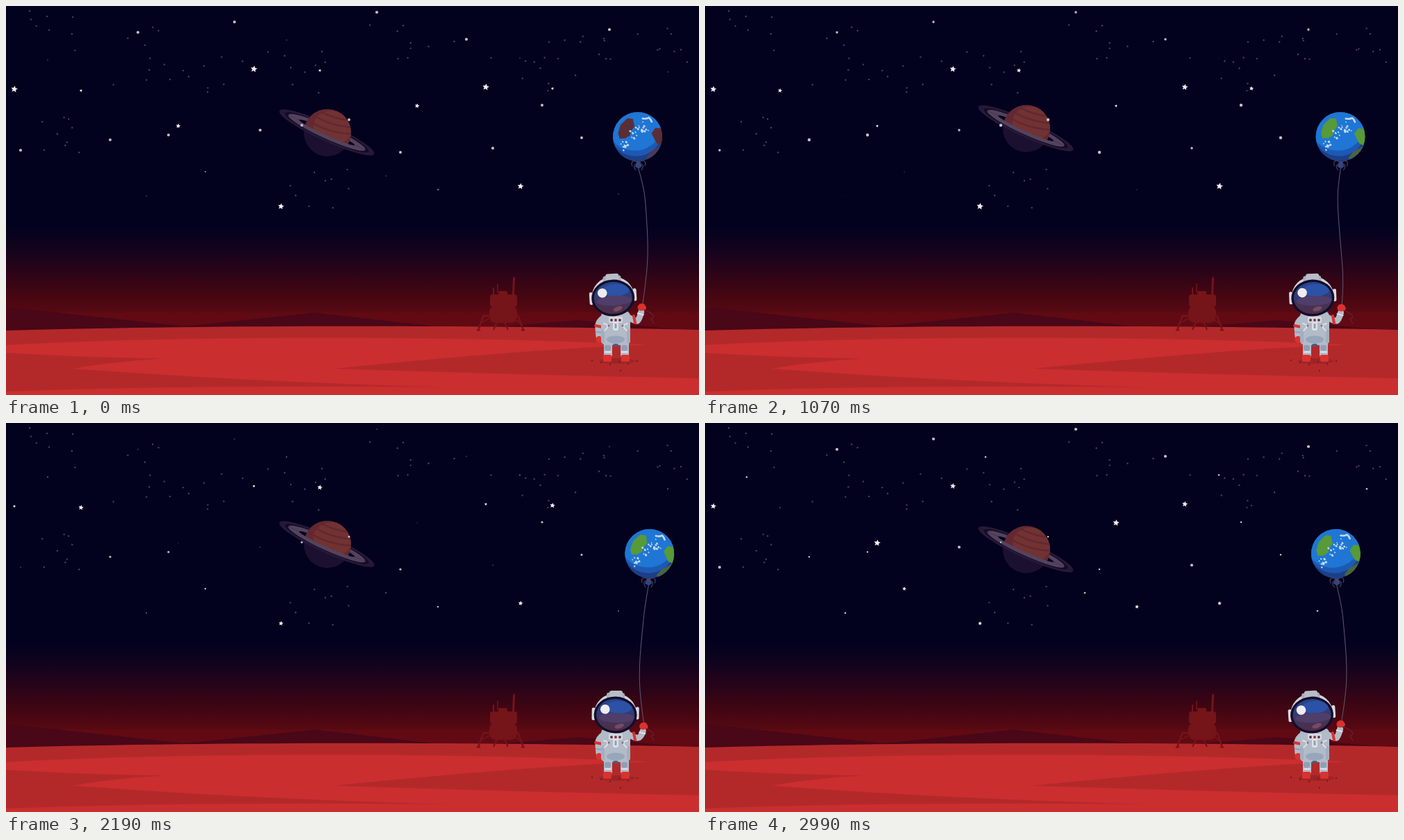
An HTML page with a canvas for the animation above (3060 ms loop, 998 by 561 pixels).

```html
<!DOCTYPE html>
<html lang="en">
<head>
<meta charset="utf-8">
<title>Astronaut with a balloon</title>
<style>
html, body { margin: 0; width: 100%; height: 100%; overflow: hidden; background: #03021e; }
canvas { display: block; width: 998px; height: 561px; }
</style>
</head>
<body>
<canvas id="stage" width="998" height="561"></canvas>
<script>
const c = document.getElementById('stage').getContext('2d');
const W = 998, H = 561, LOOP = 3060, SWAY = LOOP / 2, TWINKLE = LOOP / 6, TAU = Math.PI * 2;
const RAD = Math.PI / 180, HOLD = 130;

// The picture advances in even steps; each run is [start, steps]
const RUNS = [[0, 1], [150, 5], [810, 5], [1460, 3], [1860, 2], [2190, 2], [2470, 5]];

// Main twinkling stars: time of the peak, size, shape, places
const GROUPS = [
  [0, 5, star, [12,120, 357,91, 691,117]],
  [50, 5, star, [741,260, 396,289]],
  [320, 5, star, [287,239, 622,265]],
  [410, 5, star, [592,144, 248,173]],
  [125, 4, star, [108,122, 452,93, 787,119]],
  [475, 2.2, dot, [534,9, 329,23, 190,38, 663,48, 869,34, 366,179, 21,208, 701,205]],
  [55, 2.2, dot, [150,193, 772,143, 829,190, 494,164, 426,172, 234,186, 568,211]],
  [320, 2.3, dot, [60,78, 202,274, 882,271, 547,245, 404,49, 740,75, 953,95]]];

// Faint stars gather loosely around these places
const CLUSTERS = [60,35, 190,70, 300,100, 430,85, 590,50, 765,95, 810,55, 925,55, 90,180, 440,270];

const wave = (t, peak, period) => Math.cos(TAU * (t - peak) / period);
const clamp = v => Math.max(0, Math.min(1, v));

function seeded(seed) {
  return () => (seed = (seed * 16807) % 2147483647) / 2147483647;
}
function eachPoint(list, fn) {
  for (let i = 0; i < list.length; i += 2) fn(list[i], list[i + 1]);
}
function scatter(centres, count, rx, ry, seed, fn) {
  const rnd = seeded(seed), off = () => rnd() + rnd() - 1;
  eachPoint(centres, (x, y) => {
    for (let i = 0; i < count; i++) fn(x + rx * off(), y + ry * off(), rnd());
  });
}
function trace(pts, closed) {
  c.beginPath();
  eachPoint(pts, (x, y) => c.lineTo(x, y));
  if (closed) c.closePath();
}
function poly(color, ...pts) {
  c.fillStyle = color;
  trace(pts, true);
  c.fill();
}
function line(color, width, ...pts) {
  c.strokeStyle = color;
  c.lineWidth = width;
  trace(pts);
  c.stroke();
}
function oval(color, x, y, rx, ry = rx, turn = 0) {
  c.fillStyle = color;
  c.beginPath();
  c.ellipse(x, y, rx, ry, turn, 0, TAU);
  c.fill();
}
function box(color, x, y, w, h, r = 0) {
  c.fillStyle = color;
  c.beginPath();
  c.roundRect(x, y, w, h, r);
  c.fill();
}
// Smooth open curve guided by the given points
function curve(color, width, ...p) {
  const n = p.length;
  c.strokeStyle = color;
  c.lineWidth = width;
  c.beginPath();
  c.moveTo(p[0], p[1]);
  for (let i = 2; i < n - 4; i += 2)
    c.quadraticCurveTo(p[i], p[i + 1], (p[i] + p[i + 2]) / 2, (p[i + 1] + p[i + 3]) / 2);
  c.quadraticCurveTo(...p.slice(-4));
  c.stroke();
}
function turned(x, y, angle, draw) {
  c.save();
  c.translate(x, y);
  c.rotate(angle);
  draw();
  c.restore();
}
function inside(x, y, rx, ry, draw) {
  c.save();
  c.beginPath();
  c.ellipse(x, y, rx, ry, 0, 0, TAU);
  c.clip();
  draw();
  c.restore();
}
function gradient(top, bottom, ...colors) {
  const g = c.createLinearGradient(0, top, 0, bottom);
  colors.forEach((color, i) => g.addColorStop(i / (colors.length - 1), color));
  return g;
}
function dot(x, y, r) { oval('#c4bfcb', x, y, r); }
function star(x, y, r) {
  c.fillStyle = '#f1eef4';
  c.beginPath();
  for (let i = 0; i < 10; i++) {
    const a = i * TAU / 10 - Math.PI / 2 + 0.15, d = i % 2 ? r * 0.48 : r;
    c.lineTo(x + d * Math.cos(a), y + d * Math.sin(a));
  }
  c.fill();
}

function sky() {
  c.fillStyle = gradient(320, 448, '#03021e', '#14031d', '#2b0418', '#440612', '#5c0a13');
  c.fillRect(0, 0, W, H);
}

function hills() {
  const bump = (x, mid, height, reach) => height * Math.max(0, 1 - Math.abs(x - mid) / reach);
  box('#610a14', 0, 442, W, 40);
  const pts = [0, 480];
  for (let x = 0; x <= W; x += 6)
    pts.push(x, 461 + x / 200 - bump(x, 0, 27, 260) - bump(x, 445, 21, 190) - bump(x, 825, 12, 140));
  poly('#490717', ...pts, W, 480);
}

function ground() {
  c.fillStyle = '#b3292a';
  c.beginPath();
  c.moveTo(0, 468);
  c.bezierCurveTo(300, 460, 680, 460, W, 467);
  c.lineTo(W, H);
  c.lineTo(0, H);
  c.fill();
  c.fillStyle = '#cb2e2f';
  c.beginPath();
  c.moveTo(0, 489);
  c.bezierCurveTo(250, 475, 650, 475, 925, 488.5);
  c.quadraticCurveTo(760, 494, 472, 523);
  c.quadraticCurveTo(740, 532, W, 537);
  c.lineTo(W, H);
  c.lineTo(0, H);
  c.lineTo(0, 556);
  c.quadraticCurveTo(280, 546, 640, 550);
  c.quadraticCurveTo(350, 542, 97, 523);
  c.quadraticCurveTo(150, 513, 228, 508.5);
  c.quadraticCurveTo(90, 506, 0, 500);
  c.fill();
}

function lander() {
  const k = '#751419';
  line(k, 1.5, 732, 391, 730, 418);
  line(k, 3, 731.5, 393, 730.5, 417);
  line(k, 1.5, 708, 401, 708, 413);
  line(k, 2, 702, 407, 702, 418);
  box(k, 709, 411, 13, 8, 2);
  box(k, 697, 416, 39, 18, 4);
  box(k, 696, 432, 40, 25, 9);
  for (const s of [-1, 1]) {
    const x = d => 712.5 + s * d;
    line(k, 2.5, x(16), 447, x(25), 447, x(32), 466);
    line(k, 1.5, x(17), 451, x(28), 457);
    line(k, 2.2, x(5), 455, x(10), 466);
    line(k, 1.8, x(30), 467.5, x(34), 467.5);
  }
}

function ringPart(color, outer, inner, from) {
  c.fillStyle = color;
  c.beginPath();
  c.ellipse(0, 0, ...outer, 0, from, from + Math.PI);
  c.ellipse(0, 0, ...inner, 0, from + Math.PI, from, true);
  c.fill();
}
function rings(from) {
  ringPart('#281938', [75, 12.5], [66, 9.8], from);
  ringPart('#140c2a', [66, 9.8], [61, 8.5], from);
  ringPart('#54435d', [61, 9], [44, 4], from);
}

function planet(t) {
  const a = TAU * t / SWAY, lift = 4 * Math.cos(a) + 0.4 * Math.cos(2 * a), R = 34;
  turned(462, 177.9 + lift, 24.5 * RAD, () => {
    oval('#1c1030', 1, 0, R);
    rings(Math.PI);
    inside(1, 0, R, R, () => {
      c.beginPath();
      c.rect(-80, -80, 160, 85);
      c.clip();
      c.fillStyle = '#642831';
      c.fillRect(-40, -40, 80, 80);
      oval('#713232', 5, -10, 28, 24, -0.2);
      for (let y = -26; y < 0; y += 10) curve('#622831', 2.5, -36, y, 0, y + 8, 38, y - 9);
    });
    rings(0);
  });
}

function stars(t) {
  scatter(CLUSTERS, 9, 75, 45, 77, (x, y) => oval('#474154', x, y, 1.2));
  for (const [peak, size, shape, places] of GROUPS) {
    const s = 0.55 + 0.45 * wave(t, peak, TWINKLE);
    eachPoint(places, (x, y) => shape(x, y, size * s));
  }
}

function meteor(t) {
  const p = t % SWAY;
  const head = 1 - (1 - clamp(p / 330)) ** 1.6, tail = 1 - (1 - clamp((p - 60) / 480)) ** 2.1;
  if (head - tail < 0.01) return;
  const at = (u, a, b, d) => (1 - u) ** 2 * a + 2 * u * (1 - u) * b + u * u * d;
  const pts = [];
  for (let i = 0; i <= 12; i++) {
    const u = tail + (head - tail) * i / 12;
    pts.push(at(u, 231, 324, 369), at(u, 10, 17, 92));
  }
  line('#f6f3f8', 1.7, ...pts);
}

function earth(brown) {
  const R = 35.5, land = brown ? '#5b2d36' : '#579a37', shade = brown ? '#4c3a58' : '#4b6440';
  inside(0, 0, R, R, () => {
    c.fillStyle = '#1d3f86';
    c.fillRect(-R, -R, 2 * R, 2 * R);
    oval('#1d59b4', -2, -6, 37, 34);
    oval('#1f76d4', -4, -13, 38, 33);
    poly(land, -24, -18, -14, -27, -6, -26, -4, -15, -9, -9, -11, -2, -18, 2, -26, 2, -28, -6);
    poly(land, 20, -4, 26, -12, 34, -11, 37, 0, 34, 13, 27, 10);
    poly(shade, 11, 31, 18, 22, 29, 16, 36, 10, 28, 27, 16, 34);
    const cloud = '#c3d9ec';
    curve(cloud, 2.6, 8, -26, 14, -25, 18, -28, 21, -21);
    scatter([-3, -6, -19, 12, 10, -11], 9, 11, 11, 5, (x, y, v) =>
      oval(cloud, x, y, 0.8 + 1.4 * v, 0.7 + v, 0.8));
  });
}

function balloon(t, n, brown) {
  const x = 917.5 + 9.4 * n, lean = Math.atan(9.4 * n / 245);
  const hand = [917.5 + n, 432 + n];
  const at = (peak, amp) => 918 + amp * wave(t, peak, SWAY);
  curve('#625874', 1, 917.5 + 8 * n, 234, at(360, 7), 262, at(250, 7), 291,
    at(0, 7), 351, at(-170, 5), 396, ...hand);
  curve('#6a2a45', 1, hand[0], 438, 926, 441 + n, 934, 448 + n, 930, 452, 928, 450, 933, 458);
  turned(x, 188.5, lean, () => {
    poly('#2a4788', -2, 35, 2, 35, 5, 43, 0, 46, -5, 43);
    for (const s of [-1, 1]) {
      curve('#574253', 1.1, 0, 38, s * 6, 33, s * 11, 38, s * 9, 42);
      curve('#574253', 1.1, 0, 39, s * 5, 39, s * 7, 44, s * 4, 48);
    }
    earth(brown);
  });
}

function helmet(n) {
  turned(877, 467, (-1.5 + 2.3 * n) * RAD, () => {
    box('#d9dae0', -34, -56, 5, 18, 2);
    box('#d9dae0', 29, -58, 5, 18, 2);
    oval('#cfd1d9', 0, -48, 30.5, 29);
    box('#a9aebb', -13, -78, 26, 10, 3);
    box('#b9bdc8', -9, -81, 19, 12, 3);
    oval('#130d2b', 0, -46, 31, 26.5);
    inside(0, -46, 27.5, 23, () => {
      c.fillStyle = gradient(-69, -23, '#27458f', '#2b3f82', '#443459', '#4e2d45');
      c.fillRect(-32, -72, 64, 52);
      oval('#2b52a6', 5, -57, 19, 9);
      oval('#4f3e69', 2, -42, 26, 7);
      oval('#764a62', 6, -30, 7, 3.2, -0.3);
    });
    oval('#efebee', -15, -54, 6.8);
  });
}

function astronaut(n, hx, hy) {
  const red = '#d9322f', suit = '#b2bbc8', pale = '#dfe1e6', blue = '#8f9fb8';
  oval('#9d2426', 880, 512, 26, 4);
  for (let i = 0; i < 6; i++) oval('#7b1a1e', 844 + 13 * i, 511 + i * 3 % 7, 1.2);
  oval('#7b1a1e', 885, 526, 1.2);

  for (const s of [-1, 1]) {
    const x = 879 + s * 12;
    box(suit, x - 6, 482, 12, 24, 3);
    box(blue, x - 5, 489, 9, 8, 3);
    line(pale, 2, x - 4, 499, x + 4, 499);
    box(red, x - 6 + s, 503, 12, 10, 2);
  }
  // resting arm
  curve(suit, 9, 861, 449, 853, 455, 853, 466, 854, 476);
  line(red, 4, 849, 461, 859, 463);
  line(blue, 2, 850, 470, 858, 471);
  oval(red, 854, 481, 4.5, 5);
  // raised arm
  curve(suit, 9, 896, 449, 907, 455, hx - 4, 453, hx - 1, hy + 7);
  line(red, 4, 904, 447, 906, 457);
  line(pale, 2, hx - 6, hy + 9, hx + 2, hy + 11);
  // torso
  box(suit, 857, 440, 42, 49, 7);
  oval('#97a6bb', 878, 481, 13, 5.5);
  box('#d6d8df', 868, 448, 20, 9, 2);
  for (let i = -1; i < 2; i++) oval(i ? '#50384c' : '#982d36', 878 + 6 * i, 453, 1.9);
  box(pale, 874, 456, 8, 12, 3);
  box(blue, 876.5, 458, 3, 7, 1);
  for (const s of [-1, 1]) {
    const x = 878 + s * 12;
    box('#a3afc0', 878 + s * 18.5 - 2.5, 466, 5, 20, 2);
    curve(pale, 2, x + s * 5, 458, x, 459, x - s, 464, x + s * 4, 468);
    oval('#8a6675', x - s * 2, 461, 1.5);
  }
  oval('#465b83', 878, 489, 4, 2);
  helmet(n);
}

function glove(x, y) {
  oval('#d9322f', x - 0.5, y, 5.8, 5.2, -0.4);
  oval('#d9322f', x + 3, y + 1, 3.2, 3);
}

function draw(t) {
  const n = -wave(t, -140, SWAY), brown = t % SWAY < 100;
  const hx = 917 + 1.4 * n, hy = 435.5 + 1.5 * n;
  c.lineCap = c.lineJoin = 'round';
  sky();
  planet(t);
  stars(t);
  meteor(t);
  hills();
  ground();
  lander();
  astronaut(n, hx, hy);
  balloon(t, n, brown);
  glove(hx, hy);
}

function held(t) {
  const [from, steps] = RUNS.findLast(run => run[0] <= t);
  return from + HOLD * Math.min(steps - 1, Math.floor((t - from) / HOLD));
}

const start = performance.now();
function tick(now) {
  draw(held(Math.max(0, now - start) % LOOP));
  requestAnimationFrame(tick);
}
draw(0);
requestAnimationFrame(tick);
</script>
</body>
</html>
```
